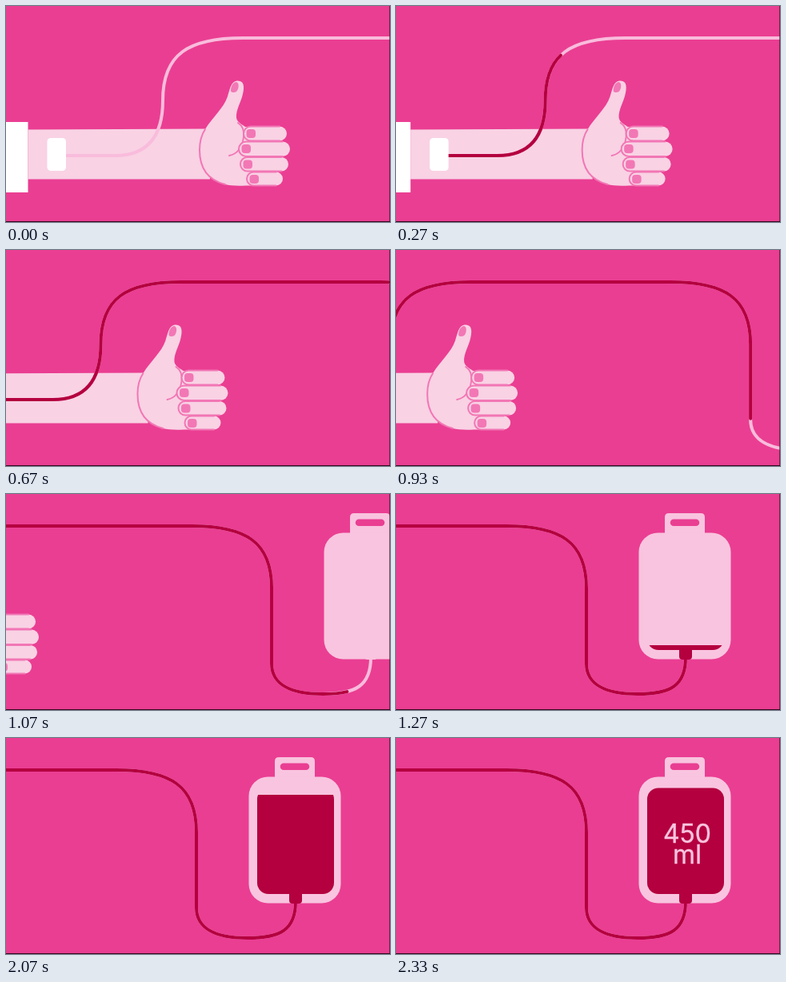
These frames come from a looping animation (480x270 px, 2.99 s). An HTML page:

```html
<!DOCTYPE html>
<html lang="en">
<head>
<meta charset="utf-8">
<title>Blood donation</title>
<style>
  html, body { margin: 0; width: 100%; height: 100%; overflow: hidden; background: #ea3e92; }
  svg { display: block; width: 100%; height: 100%; }
  .skin { fill: #f9d2e4; }
  .line { fill: none; stroke: #f277b5; stroke-width: 2; stroke-linecap: round; }
  .nail { fill: #f277b5; }
  .pale { fill: #f9c4df; }
  .blood { fill: #b4003f; }
  .tube { fill: none; stroke: #f9bcdc; stroke-width: 4; }
  #flow { stroke: #b4003f; stroke-linecap: round; }
  text { font: 400 32px Inter, Roboto, sans-serif; text-anchor: middle; fill: #f9c4df; stroke: #f9c4df; stroke-width: .4; }
</style>
</head>
<body>
<svg viewBox="0 0 480 270">
  <defs>
    <path id="route" d="M72,187 H136 C178,187 196,162 196,118 C196,60 228,40 296,40
      H546 C614,40 646,60 646,118 V212 C646,238 670,250 710,250 C751,250 770,240 770,204"/>
    <clipPath id="level"><rect id="levelRect" x="300" width="120" height="140"/></clipPath>
  </defs>
  <g id="world">
    <rect x="-10" y="145" width="37.5" height="88" fill="#fff"/>
    <path class="skin" d="M27.5,154.5 L255,153.5 V216.5 H27.5Z"/>
    <path class="skin" d="M249,154 C258,139 272,128 277,113 C280,104 281,93.5 290,93.5 C298,93.5 298,102 296,110
      C294,120 287,130 288,140 C289,146 297,149 299,151 H312 V224.5 H300 C288,225 280,224.5 274,223
      C250,217 242,200 242,180 C242,168 245,160 249,154Z"/>
    <path class="line" d="M249,154 C245,160 242,168 242,180 C242,200 250,217 274,223"/>
    <path class="line" d="M290,146 C296,150 298,156 297,164 C295,178 289,185 279,187"/>
    <path class="nail" d="M281,106 C281,100 284,95 288,95 C292,96 291,104 288,107 C285,109 281,108 281,106Z"/>
    <g id="fingers"></g>
    <use href="#route" class="tube"/>
    <use href="#route" class="tube" id="flow"/>
    <rect x="51.5" y="165" width="23.5" height="41" rx="4.5" fill="#fff"/>
    <g id="bag">
      <path class="pale" fill-rule="evenodd" d="M336,50 V29 Q336,24 341,24 H381 Q386,24 386,29 V50Z
        M347,31.5 a4.2,4.2 0 0 0 0,8.5 H375 a4.2,4.2 0 0 0 0,-8.5Z"/>
      <rect class="pale" x="303.5" y="48.5" width="115" height="158" rx="24"/>
      <rect class="blood" x="314" y="62.5" width="96" height="132.5" rx="14" clip-path="url(#level)"/>
      <path id="valve" d="M354,194 H370 V203 Q370,207 366,207 H358 Q354,207 354,203Z"/>
      <g id="label"><text x="364" y="131">450</text><text x="364" y="157">ml</text></g>
    </g>
  </g>
  <rect y="269" width="480" height="1" fill="#35081f"/>
  <rect x="479.4" width=".6" height="270" fill="#35081f"/>
</svg>
<script>
const $ = id => document.getElementById(id);
const LOOP = 2990, FRAME = 1000 / 15, PAN = 408;

// Curled fingers: left, top, right, height
$('fingers').innerHTML = [[297, 150.5, 351, 18], [291, 169.5, 355, 18.5], [293, 189, 353, 17.5], [301, 207.5, 346, 17]]
  .map(([x, y, right, h]) => {
    const r = h / 2;
    return `<rect class="skin" x="${x}" y="${y}" width="${right - x}" height="${h}" rx="${r}"/>
      <path class="line" stroke-width="1.5" d="M${right - r},${y} H${x + r} a${r},${r} 0 0 0 0,${h} H${right - r}"/>
      <rect class="nail" x="${x + 3.5}" y="${y + 3.5}" width="11.5" height="11" rx="4"/>`;
  }).join('');

const bezier = (a, b, s) => 3 * a * s * (1 - s) ** 2 + 3 * b * s * s * (1 - s) + s ** 3;

function ease(x) {
  let lo = 0, hi = 1;
  for (let i = 0; i < 24; i++) {
    const mid = (lo + hi) / 2;
    if (bezier(0.86, 0.775, mid) < x) lo = mid; else hi = mid;
  }
  return bezier(0, 1, lo);
}

function draw(now) {
  // The picture advances in steps of 1/15 s and holds at the end
  const k = Math.min(35, Math.floor((now % LOOP + 3.4) / FRAME));
  const shift = k < 19 ? PAN * ease(k / 19) : PAN;
  $('world').setAttribute('transform', `translate(${-shift} 0)`);
  $('flow').setAttribute('stroke-dasharray', `${57.5 * k} 2000`);
  $('valve').setAttribute('class', k > 16 ? 'blood' : 'pale');
  $('levelRect').setAttribute('y', Math.max(62, 189 - 9.83 * (k - 19)));

  const pop = k > 31 ? 1 + 0.25 * Math.sin(Math.PI * (k - 31) / 4) ** 4 : 1;
  $('bag').setAttribute('transform', `translate(${PAN + 361} 114) scale(${pop}) translate(-361 -114)`);
  $('label').setAttribute('visibility', k > 31 ? 'visible' : 'hidden');
}

const start = performance.now();
(function tick() {
  draw(performance.now() - start);
  requestAnimationFrame(tick);
})();
</script>
</body>
</html>
```
